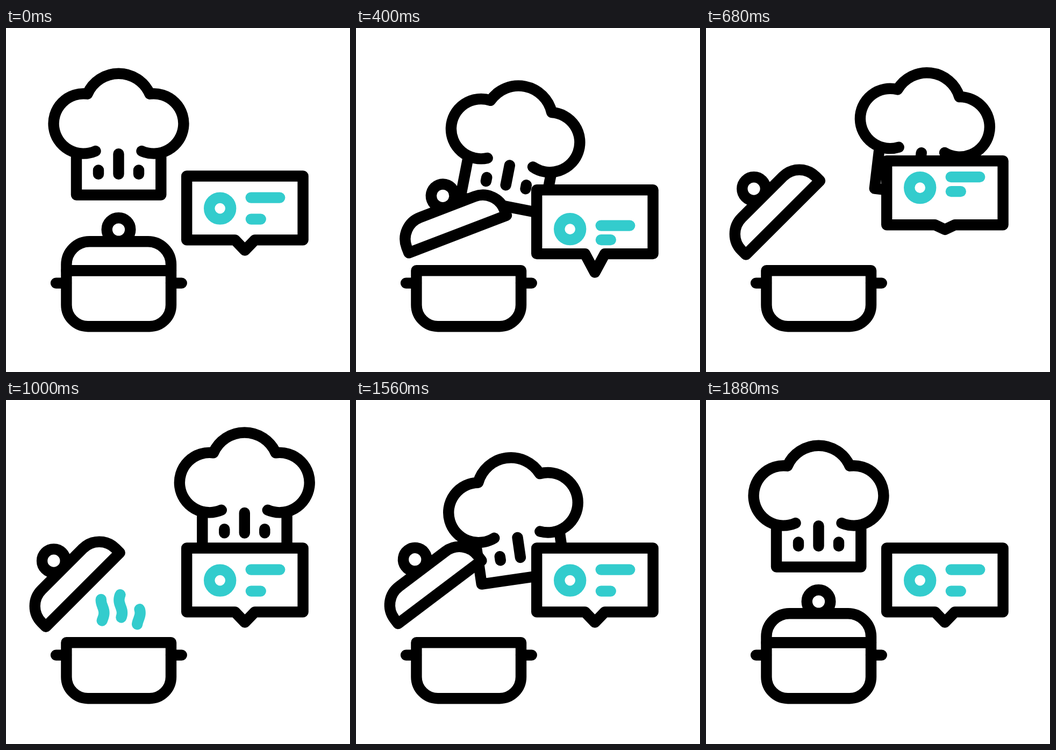
An HTML page for the animation above (2 s loop, 640 by 640 pixels).

```html
<!DOCTYPE html>
<html lang="en">
<head>
<meta charset="utf-8">
<title>Cooking</title>
<style>
  html, body { margin: 0; height: 100%; overflow: hidden; background: #fff; }
  svg { display: block; width: 100vw; height: 100vh; }
  svg * { stroke-linecap: round; stroke-linejoin: round; }
  .ink { fill: none; stroke: #000; stroke-width: 20.4; }
  .solid { fill: #fff; }
  .teal { fill: none; stroke: #33cccd; stroke-width: 20.4; }
</style>
</head>
<body>
<svg viewBox="0 0 640 640">
  <g id="hat" class="ink">
    <path d="M131 235V310.6H288.3V235"/>
    <path d="M166.5 229A55.7 55.7 0 1 1 151.5 122.7A63.3 63.3 0 0 1 267.5 122.7A55.7 55.7 0 1 1 252.5 229"/>
    <path d="M209.5 234.3V271.8M172 264.5V271.7M247 264.5V271.7"/>
  </g>
  <g class="ink">
    <path d="M112.4 451.3H307V515A40 40 0 0 1 267 555.2H152.4A40 40 0 0 1 112.4 515Z"/>
    <path d="M93 474.6H112M307 474.6H326.8"/>
  </g>
  <g id="steam" class="teal"><path/><path/><path/></g>
  <g id="lid" class="ink solid">
    <circle cx="209.5" cy="375" r="21.8"/>
    <path d="M112.4 451.3V440A43 43 0 0 1 155.4 397.2H264A43 43 0 0 1 307 440V451.3Z"/>
  </g>
  <path id="box" class="ink solid"/>
  <g class="teal">
    <circle id="dot" cx="398.2" cy="335.6" r="20"/>
    <path id="barA" d="M455.7 315.6H509.2"/>
    <path id="barB" d="M455.9 355.6H473.8"/>
  </g>
</svg>
<script>
const $ = id => document.getElementById(id);
const mix = (a, b, k) => a + (b - a) * k;

// eased progress from time a to time b
function ease(t, a, b) {
  const s = Math.min(1, Math.max(0, (t - a) / (b - a)));
  return s * s * (3 - 2 * s);
}

const place = (el, x, y, turn = 0, cx = 0, cy = 0) =>
  el.setAttribute('transform', `translate(${x} ${y}) rotate(${turn} ${cx} ${cy})`);

function drawHat(t) {
  const u = ease(t, 68, 893) - ease(t, 1193, 1815);
  const turn = 12.5 * (ease(t, 68, 490) - ease(t, 490, 893))
             - 9 * (ease(t, 1193, 1504) - ease(t, 1504, 1815));
  place($('hat'), 234.3 * u, -24.3 * u + 133 * u * (1 - u), turn, 209.5, 198);
}

function drawLid(t) {
  const r = ease(t, 130, 695) - ease(t, 1443, 1880);
  place($('lid'), -86 * r * r * (2.16 - 1.16 * r), -90.2 * r * (2.06 - 1.06 * r),
        -45 * r, 209.5, 424);
}

function drawBubble(t) {
  const down = ease(t, 80, 400), up = ease(t, 400, 680), back = ease(t, 680, 960);
  const sway = (low, high) => mix(mix(low * down, high, up), 0, back);
  const y = sway(25.7, -28.2);
  const top = 275.5 + y, base = 394.4 + y, tip = 413.6 + sway(41, -38.7);
  $('box').setAttribute('d',
    `M336.2 ${top}H552.6V${base}H463L444.4 ${tip}L426 ${base}H336.2Z`);
  place($('dot'), 0, sway(38.5, -38.5));
  place($('barA'), 0, sway(52, -38.5));
  place($('barB'), 0, sway(38.5, -51.5));
}

// Each wisp is a travelling piece of one wavy line
function drawSteam(t) {
  [40, 0, 113].forEach((delay, i) => {
    const head = ease(t, 708 + delay, 1108 + delay);
    const tail = ease(t, 855 + delay, 1363 + delay);
    let d = '';
    if (head > tail) {
      for (let k = 0; k <= 24; k++) {
        const y = 418 - 68 * mix(tail, head, k / 24);
        const x = 179.6 + 33.6 * i + 2.8 * Math.cos((y - 348) * Math.PI / 24);
        d += (k ? 'L' : 'M') + x.toFixed(2) + ' ' + y.toFixed(2);
      }
    }
    $('steam').children[i].setAttribute('d', d);
  });
}

function frame() {
  const t = Math.floor(performance.now() / 40) * 40 % 2000;
  drawHat(t);
  drawLid(t);
  drawBubble(t);
  drawSteam(t);
  requestAnimationFrame(frame);
}
frame();
</script>
</body>
</html>
```
